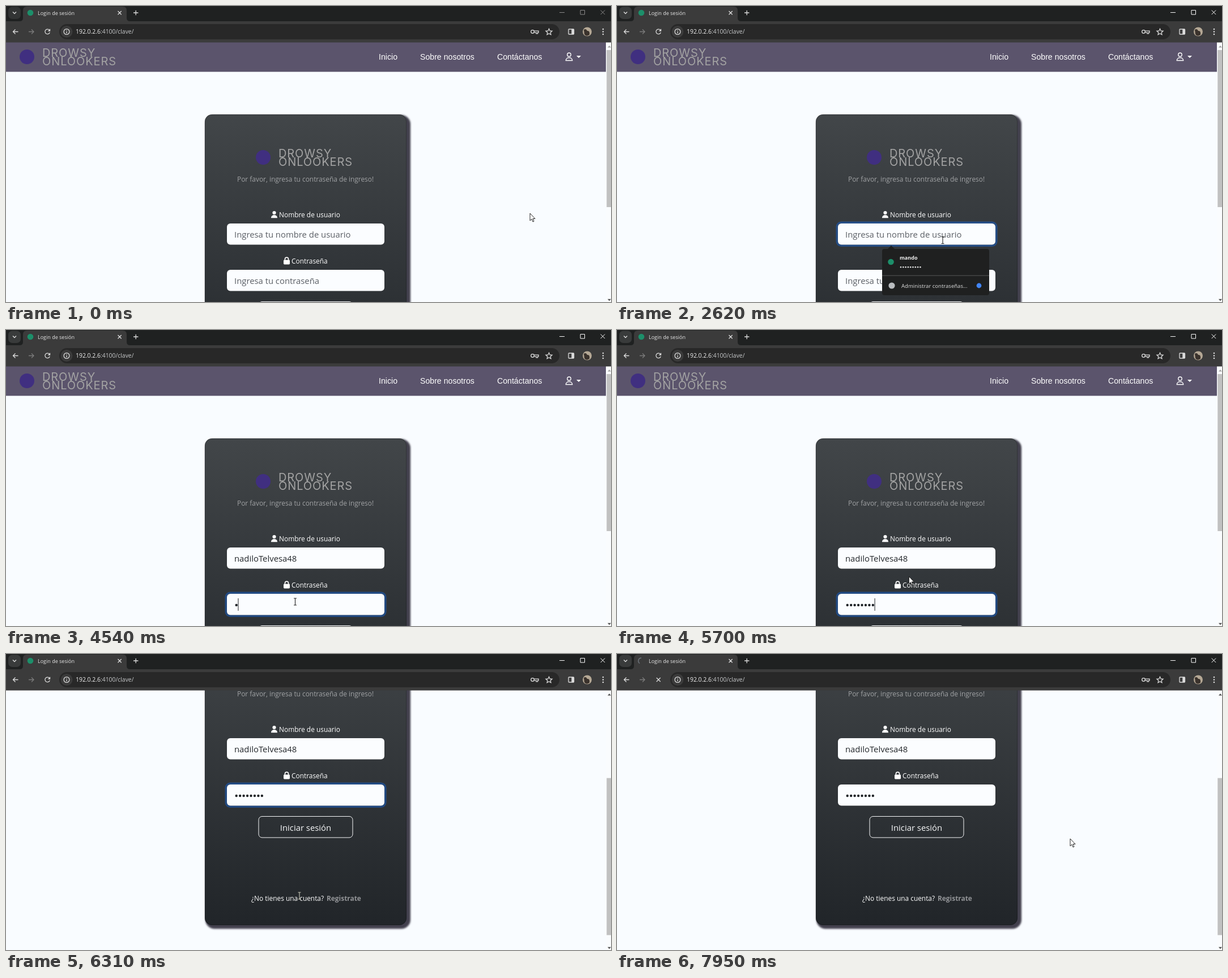
Recreate the animation shown at these times as an HTML page. Size 1068x524 px, loop 8000 ms.

```html
<!DOCTYPE html>
<html lang="es">
<head>
<meta charset="utf-8">
<title>Login de sesión</title>
<style>
  html, body { margin: 0; width: 100%; height: 100%; overflow: hidden; background: #f9fcff; }
  svg { display: block; width: 100%; height: 100%; }
  text { font-family: "Open Sans", "Noto Sans", sans-serif; font-size: 11.9px; white-space: pre; }
  .nav { font-family: "Liberation Sans", Arial, sans-serif; font-size: 14.15px; fill: #fff; }
  .brand { font-family: Inter, sans-serif; font-size: 20px; letter-spacing: .9px; fill: #a3a3a3; }
  .big { font-size: 14.85px; }
  .line { fill: none; stroke: #dcdcdc; stroke-width: 1.3; }
</style>
</head>
<body>
<svg id="stage" viewBox="0 0 1068 524" preserveAspectRatio="none"></svg>
<script>
const DURATION = 8000;
const stage = document.getElementById('stage');

const rect = (x, y, w, h, fill, rx = 0, more = '') =>
  `<rect x="${x}" y="${y}" width="${w}" height="${h}" rx="${rx}" fill="${fill}" ${more}/>`;
const circle = (x, y, r, fill, more = '') => `<circle cx="${x}" cy="${y}" r="${r}" fill="${fill}" ${more}/>`;
const text = (x, y, str, fill, more = '') => `<text x="${x}" y="${y}" fill="${fill}" ${more}>${str}</text>`;
const path = (d, more = 'class="line"') => `<path d="${d}" ${more}/>`;
const dots = (n, x, y, step, r, fill) =>
  Array.from({ length: n }, (_, i) => circle(x + i * step, y, r, fill)).join('');

const logo = (x, y) => `<g transform="translate(${x} ${y})">
  ${circle(22, 0, 13, '#402f80')}
  <text class="brand" x="49" y="0">DROWSY</text>
  <text class="brand" x="49" y="15.4">ONLOOKERS</text></g>`;

const field = (name, y, hint) => `
  <g id="${name}Ring">${rect(388.2, y - 1.8, 281.6, 41, 'none', 7.5, 'stroke="#0d6efd" stroke-opacity=".38" stroke-width="3.4"')}</g>
  ${rect(390, y, 278, 37.4, '#fbfdff', 6)}
  ${text(403, y + 25, hint, '#5b5f65', `class="big" id="${name}Hint"`)}`;

const page = `
  ${rect(0, 64, 1059, 52.5, '#5b546c')}
  ${logo(15, 90)}
  <text class="nav" x="658" y="95">Inicio</text>
  <text class="nav" x="731" y="95">Sobre nosotros</text>
  <text class="nav" x="867" y="95">Contáctanos</text>
  ${path('M988.3 96.5C988.3 89.8 999.7 89.8 999.7 96.5ZM990.8 86.2a3.2 3.2 0 1 0 6.4 0a3.2 3.2 0 1 0-6.4 0', 'fill="none" stroke="#fff" stroke-width="1.4"')}
  ${path('M1007 88h8l-4 4z', 'fill="#fff"')}
  ${rect(352, 193, 362, 529.5, '#433f4e', 16, 'filter="url(#soft)"')}
  ${rect(351, 192, 356, 524, 'url(#card)', 12.5)}
  ${rect(351.4, 192.4, 355.2, 523.2, 'none', 12.2, 'stroke="#000" stroke-opacity=".3" stroke-width=".8"')}
  ${logo(432, 268)}
  ${text(408, 311, 'Por favor, ingresa tu contraseña de ingreso!', '#a0a2a4')}
  ${path('M468 375.3C468 368.2 479 368.2 479 375.3ZM470.4 366a3.1 3.1 0 1 0 6.2 0a3.1 3.1 0 1 0-6.2 0', 'fill="#fff"')}
  ${text(482, 373.7, 'Nombre de usuario', '#fff')}
  ${field('user', 385, 'Ingresa tu nombre de usuario')}
  ${text(403, 410, 'nadiloTelvesa48', '#212529', 'class="big" id="userText"')}
  ${rect(490, 449.6, 11, 7.8, '#fff', 1.4)}
  ${path('M492.4 450v-1.8a3.1 3.1 0 0 1 6.2 0v1.8', 'fill="none" stroke="#fff" stroke-width="1.6"')}
  ${text(504, 455.7, 'Contraseña', '#fff')}
  ${field('pass', 467, 'Ingresa tu contraseña')}
  <g id="passDots">${dots(8, 406.7, 487, 6.45, 2.2, '#212529')}</g>
  ${rect(0, 0, 1, 22, '#212529', 0, 'id="caret"')}
  ${rect(446, 523.5, 166, 37.5, 'none', 6, 'id="button" stroke="#f8f9fa"')}
  ${text(529, 548.5, 'Iniciar sesión', '#f8f9fa', 'class="big" text-anchor="middle" id="buttonText"')}
  ${text(433, 672.6, '¿No tienes una cuenta?', '#fff')}
  ${text(566, 672.6, 'Registrate', '#929497', 'font-weight="700"')}`;

const popup = `
  ${path('M477.5 430.5l6.5-6.5 6.5 6.5z', 'id="tipUp" fill="#1f2020"')}
  ${path('M477.5 511.5l6.5 6 6.5-6z', 'id="tipDown" fill="#1f2020"')}
  ${rect(468, 430, 189, 82, '#1f2020', 4)}
  ${rect(468, 476.7, 189, 1, '#565757')}
  ${circle(483.5, 453, 5.3, '#1d8f6a')}
  ${text(499, 448.5, 'mando', '#f2f2f2', 'font-weight="700" style="font-size:9px"')}
  ${dots(9, 501, 462.3, 4.3, 1.3, '#e8e8e8')}
  ${circle(485, 495, 5.6, '#b9bcbf')}
  ${text(502, 498.6, 'Administrar contraseñas...', '#dedede', 'style="font-size:9.55px"')}
  ${circle(639, 495, 4.4, '#4285f4')}`;

const browser = `
  ${rect(0, 0, 1068, 28, '#1f2121')}
  ${rect(0, 27, 1068, 37.5, '#3b3b3b')}
  ${path('M24 27q6 0 6-6V8q0-7 7-7H206q7 0 7 7V21q0 6 6 6z', 'fill="#3b3b3b"')}
  ${rect(4, 1.5, 22, 21.5, '#343636', 7, 'id="tabMenu"')}
  ${path('M12 10.5l3 3 3-3M197.5 9l6.2 6.2M203.700 9l-6.200 6.200M225 12h8.400M229.200 7.800v8.400')}
  ${circle(43, 12, 5.3, '#1d8f6a', 'id="favicon"')}
  ${path('M43 7A5.200 5.200 0 0 0 40 16.500', 'id="spinner" fill="none" stroke="#6d747b" stroke-width="1.500"')}
  ${text(56, 15.6, 'Login de sesión', '#e6e6e6', 'style="font-size:9px"')}
  <g id="controls" fill="none">${path('M977 11.5h9M1014 7.500h7.500v7.500h-7.500zM1049.700 7.500l7.500 7.500M1057.200 7.500l-7.500 7.500', '')}</g>
  ${path('M21.500 45.500h-9M16.500 41.500l-4 4 4 4')}
  ${path('M40 45.500h9M45 41.500l4 4-4 4', 'fill="none" stroke="#7b7b7b" stroke-width="1.300"')}
  ${path('M77 43.300a4.300 4.300 0 1 0 .3 3.400M77.500 40.800v3.200h-3.200', 'class="line" id="reload"')}
  ${path('M69.700 42l7 7M76.700 42l-7 7', 'class="line" id="stop"')}
  ${rect(94, 32, 883, 27, '#282828', 13.5)}
  ${circle(107, 45.5, 10.5, '#3b3b3b')}
  ${circle(107, 45.5, 4.9, 'none', 'class="line"')}
  ${path('M107 45v3.300M107 42.500v1.200')}
  <text x="123" y="49.300" fill="#f0f0f0" style="font-size:10.400px">192.0.2.6<tspan fill="#c6c8ca">:4100/clave/</tspan></text>
  ${circle(929.5, 45.5, 2.8, 'none', 'class="line"')}
  ${path('M932 44.200h8v2.600h-1.500v2h-2.500v-2h-4')}
  ${path('M958.500 40.300l1.600 3.600 3.900.4-2.900 2.600.8 3.900-3.400-2-3.400 2 .8-3.900-2.900-2.600 3.900-.4z')}
  ${rect(993, 41, 9.5, 9, 'none', 1, 'class="line"')}
  ${rect(998.3, 41, 4.2, 9, '#dcdcdc')}
  ${circle(1026, 45.5, 8, '#b5a895')}
  ${path('M1020 42q4-3 6 2 5-1 4 7-6 4-9-1z', 'fill="#3a322c"')}
  ${[41, 45.5, 50].map(y => circle(1054, y, 1.3, '#dcdcdc')).join('')}`;

stage.innerHTML = `
  <defs>
    <linearGradient id="card" x1="0" y1="0" x2="0" y2="1">
      <stop stop-color="#424649"/><stop offset="1" stop-color="#212529"/>
    </linearGradient>
    <filter id="soft" x="-5%" y="-5%" width="110%" height="110%"><feGaussianBlur stdDeviation="1.600"/></filter>
  </defs>
  ${rect(0, 0, 1068, 524, '#f9fcff')}
  <g id="page">${page}</g>
  ${rect(1059, 64, 9, 460, '#fafcfe')}
  ${rect(1060.3, 78, 8, 278, '#c1c1c1', 0, 'id="thumb"')}
  ${path('M1062 73.500h6l-3-3.500z', 'id="arrowUp"')}
  ${path('M1062 518.700h6l-3 3.500z', 'fill="#505050"')}
  <g id="popup">${popup}</g>
  ${browser}
  <g id="cursor">
    ${path('M0 0V13L3 10.200L5 15L7 14.100L5 9.500H9Z', 'id="arrow" fill="#fff" stroke="#111" stroke-width=".900"')}
    ${path('M-2.500-6H2.500M0-6V6M-2.500 6H2.500', 'id="beam" fill="none" stroke-width="1.100"')}
    ${path('M-1.300 7V-1q1.300-2 2.600 0V4l6 1.500q1.500.5 1.200 2.500l-1 6H0l-4-5.500q0-2 2.700 0z', 'id="hand" fill="#fff" stroke="#111" stroke-width=".900"')}
  </g>`;

const el = {};
stage.querySelectorAll('[id]').forEach(node => el[node.id] = node);

const ramp = (t, a, b) => Math.min(1, Math.max(0, (t - a) / (b - a)));
const within = (t, a, b) => t >= a && t < b;
const ease = p => 1 - (1 - p) ** 2;
const show = (node, on) => node.setAttribute('opacity', +on);
const set = (node, attrs) => { for (const k in attrs) node.setAttribute(k, attrs[k]); };

// Pointer moves: first step, last step, x, y
const TICK = 70;
const moves = [
  [70, 190, 928, 365], [720, 790, 931, 365],
  [1120, 1330, 662, 339], [1400, 1540, 575, 414.5],
  [3170, 3240, 506, 467.8], [3400, 3540, 510.5, 481],
  [5550, 5760, 517, 421.5], [6180, 6310, 518, 428],
  [6390, 6740, 531, 309], [7400, 7750, 757, 324], [7820, 7950, 800, 327]
];
function pointer(t) {
  let x = 925, y = 367;
  for (const [a, b, tx, ty] of moves) {
    if (t < a) break;
    const steps = Math.round((b - a) / TICK) + 1;
    const p = t >= b ? 1 : Math.min(1, (Math.floor((t - a) / TICK) + 1) / steps);
    x += (tx - x) * p;
    y += (ty - y) * p;
  }
  return { x, y };
}

const scrollAt = t => 78.7 * ease(ramp(t, 5740, 5930)) + 157.3 * ease(ramp(t, 6150, 6305));
const typed = t => t < 4540 ? 0 : t >= 5350 ? 8 : Math.min(7, 1 + Math.floor((t - 4540) / 113));
const caretOn = [[1960, 2620], [2890, 3400], [3810, 4340], [4540, 5850], [6390, 6850]];

function draw(t) {
  const scroll = scrollAt(t), filled = t >= 2890, count = typed(t);

  set(el.page, { transform: `translate(0 ${-scroll})` });
  set(el.thumb, { y: 78 + scroll * .6 });
  set(el.arrowUp, { fill: scroll > 0 ? '#505050' : '#a3a3a3' });

  show(el.userRing, ramp(t, 1880, 1980) - ramp(t, 3730, 3860));
  show(el.passRing, ramp(t, 3730, 3860) - ramp(t, 6980, 7110));
  show(el.userHint, !filled);
  show(el.userText, filled);
  show(el.passHint, !count);
  [...el.passDots.children].forEach((dot, i) => show(dot, i < count));

  const inPass = t >= 3740;
  const userEnd = filled ? el.userText.getComputedTextLength() + .5 : 0;
  set(el.caret, { x: 403 + (inPass ? count * 6.45 : userEnd), y: inPass ? 475 : 393 });
  show(el.caret, caretOn.some(([a, b]) => within(t, a, b)));

  const above = t > 3000;
  show(el.popup, within(t, 2150, 2890) ? ramp(t, 2130, 2250) : within(t, 3740, 4540) ? ramp(t, 3740, 3880) : 0);
  set(el.popup, { transform: `translate(0 ${above ? -53 : 0})` });
  show(el.tipUp, !above);
  show(el.tipDown, above);

  const active = t >= 1900, loading = t >= 7060;
  set(el.controls, { stroke: active ? '#fff' : '#8b8b8b' });
  set(el.tabMenu, { fill: active ? '#393b3b' : '#323434' });
  show(el.favicon, !loading);
  show(el.spinner, loading);
  set(el.spinner, { transform: `rotate(${(7950 - t) * .24} 43 12)` });
  show(el.reload, !loading);
  show(el.stop, loading);

  const { x, y } = pointer(t), py = y + scroll;
  const over = (x0, y0, x1, y1) => x >= x0 && x <= x1 && py >= y0 && py <= y1;
  const onField = over(390, 385, 668, 423) || over(390, 467, 668, 505);
  const onText = over(433, 658, 562, 680);
  const onButton = over(446, 523, 612, 561);
  set(el.cursor, { transform: `translate(${x} ${y})` });
  show(el.beam, onField || onText);
  set(el.beam, { stroke: onField ? '#222' : '#c9c9b8' });
  show(el.hand, onButton);
  show(el.arrow, !(onField || onText || onButton));
  set(el.button, { fill: onButton ? '#f8f9fa' : 'none' });
  set(el.buttonText, { fill: onButton ? '#111' : '#f8f9fa' });
}

const start = performance.now();
function tick() {
  draw((performance.now() - start) % DURATION);
  requestAnimationFrame(tick);
}
tick();
</script>
</body>
</html>
```
